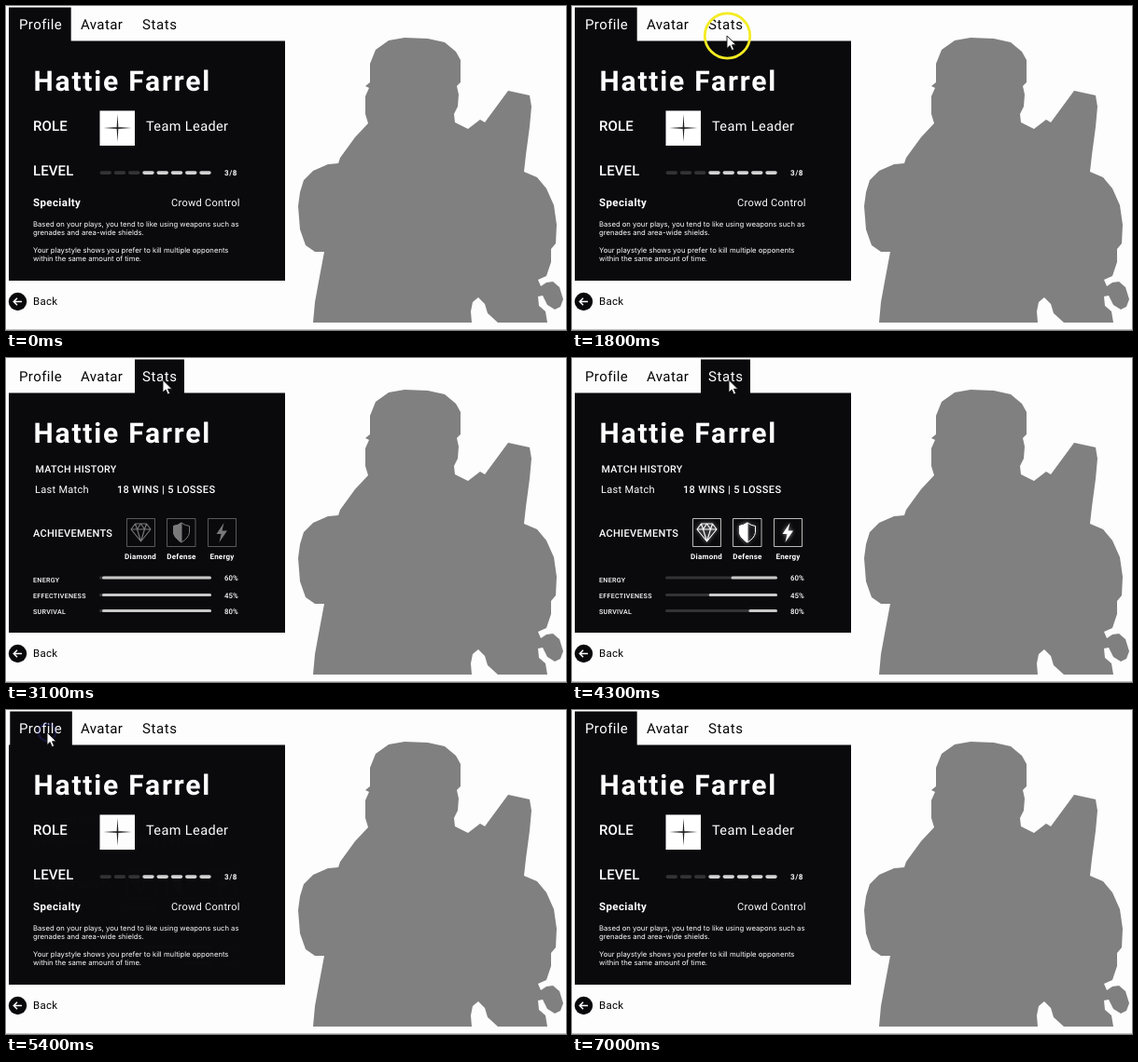
An HTML page that plays this animation: 600x348 px, repeating every 8 s.

```html
<!DOCTYPE html>
<html lang="en">
<head>
<meta charset="utf-8">
<title>Player profile</title>
<style>
  html, body { margin: 0; width: 100%; height: 100%; overflow: hidden; background: #fdfdfe; }
  svg { display: block; width: 600px; height: 348px; font-family: Roboto, Inter, sans-serif; text-rendering: geometricPrecision; }
  .body { font-family: Inter, sans-serif; }
  .icons { fill: none; stroke: #fff; stroke-linejoin: round; }
</style>
</head>
<body>
<svg viewBox="0 0 600 348">
  <path fill="#808080" d="M427 34L452 35 470 39 482 49 487 58V82L483 86 485 95 484 108 480 116 481 125 495 132 508 122 513 125 538 91 561 96 563 108 561 130 557 160 555 178 569 184 579 196 587 214 590 235 589 255 584 261 584 275 579 290 570 294 573 301 579 297 586 296 593 302 597 315 594 323 588 326 580 321 575 311 570 312 571 322 578 328 580 340H527L516 330 513 320 506 313 500 318 498 328 499 340H329L331 318 335 296 338 280 341 264 331 264 321 257 315 240 313 215 315 200 319 187 329 177 345 170 356 169 358 163 374 141 388 126 385 116V97L389 88 385 86 390 82V62L396 47 410 37Z"/>
  <path d="M0 347.5H600" stroke="#c4c4c8"/>
  <rect x="3" y="37.5" width="296" height="257.500" fill="#0a0a0d"/>
  <rect id="tab" y="1.5" height="37" fill="#0a0a0d"/>
  <g id="tabs"></g>
  <g id="head" fill="#fff"></g>
  <g id="profile" fill="#fff">
    <rect x="100.500" y="112.500" width="37.500" height="37.500"/>
    <path fill="#222" d="M119.500 116l.9 15-.9 15-.9-15zM104.500 131l15-.9 15 .9-15 .9z"/>
  </g>
  <g id="stats" fill="#fff">
    <g id="icons" class="icons">
      <path d="M129.500 172.500h30v30h-30zM172.500 172.500h30.500v30h-30.500zM216.500 172.500h30v30h-30z" stroke-width=".9" stroke-opacity=".8"/>
      <g id="art">
        <path d="M138.500 178h12l4.500 6-10.500 13-10.500-13zM134 184h21M138.500 178l2 6 4 13 4-13 2-6M140.500 184l4-6 4 6" stroke-width="1.100"/>
        <path d="M188 177q4 3 8.500 3.500v7q-1 6-8.500 10.500-7.500-4.500-8.500-10.500v-7q4.500-.5 8.500-3.500z"/>
        <path d="M188 177q-4 3-8.500 3.500v7q1 6 8.500 10.500z" fill="#fff"/>
        <path d="M233.500 177l-8 12h5l-2 9 8.500-12.500h-5.500z" fill="#fff" stroke="none"/>
      </g>
    </g>
  </g>
  <circle cx="12.500" cy="317.500" r="9.700" fill="#08080a"/>
  <path d="M17 317.500H8.500M12 313.800l-3.700 3.700 3.700 3.700" fill="none" stroke="#fff" stroke-width="1.500"/>
  <g id="foot"></g>
  <g id="pointer">
    <circle id="halo" cx=".5" r="24.200" fill="none" stroke="#f4ec22" stroke-width="2.800"/>
    <circle id="click" fill="none" stroke="#3d3fd0" stroke-width="2.400"/>
    <path d="M0 0V13.500L3.200 10.600 5.300 15.600 7.600 14.600 5.500 9.800H9.800Z" fill="#fff" stroke="#111" stroke-width=".9"/>
  </g>
</svg>
<script>
const $ = id => document.getElementById(id);

function add(parent, tag, attrs, text) {
  const el = document.createElementNS('http://www.w3.org/2000/svg', tag);
  for (const k in attrs) el.setAttribute(k, attrs[k]);
  if (text) el.textContent = text;
  return $(parent).appendChild(el);
}
const label = (parent, x, y, size, text, weight = 400, gap = .3, more = {}) =>
  add(parent, 'text', { x, y, 'font-size': size, 'font-weight': weight, 'letter-spacing': gap, ...more }, text);
const bar = (parent, x, y, width, height, fill) =>
  add(parent, 'rect', { x, y, width, height, rx: height / 2, fill });

const profileTab = label('tabs', 14, 25, 15, 'Profile', 400, .4);
label('tabs', 80, 25, 15, 'Avatar', 400, .4);
const statsTab = label('tabs', 146, 25, 15, 'Stats', 400, .6);
label('head', 29.500, 91, 30, 'Hattie Farrel', 700, 1.8);
label('foot', 29, 321, 11.400, 'Back', 400, .3);

label('profile', 29, 134, 15, 'ROLE', 500, .1);
label('profile', 150, 134, 14.500, 'Team Leader', 400, .4);
label('profile', 29, 182, 15, 'LEVEL', 500, .1);
label('profile', 234, 182.200, 8, '3/8', 700, .6);
label('profile', 29, 214.500, 11.500, 'Specialty', 700, .4);
label('profile', 177, 214.500, 11, 'Crowd Control');
[
  [236.500, 'Based on your plays, you tend to like using weapons such as'],
  [246, 'grenades and area-wide shields.'],
  [264.700, 'Your playstyle shows you prefer to kill multiple opponents'],
  [274.200, 'within the same amount of time.']
].forEach(([y, text]) => label('profile', 29, y, 7.7, text, 400, 0, { class: 'body' }));
for (let i = 0; i < 8; i++) bar('profile', 100.500 + i * 15.250, 177.300, 12.500, 3.600, i < 3 ? '#333336' : '#d2d2d2');

label('stats', 31.500, 123, 10.700, 'MATCH HISTORY', 500);
label('stats', 31, 144.500, 11, 'Last Match');
label('stats', 119, 144.500, 11, '18 WINS | 5 LOSSES', 500, .35);
label('stats', 29, 191.500, 11, 'ACHIEVEMENTS', 500);
[[144, 'Diamond'], [188, 'Defense'], [231.500, 'Energy']].forEach(([x, text]) =>
  label('stats', x, 216, 8, text, 700, .25, { 'text-anchor': 'middle' }));
const meters = [
  [236, 'ENERGY', '60%', 71, 241],
  [254.500, 'EFFECTIVENESS', '45%', 47, 257.500],
  [271.500, 'SURVIVAL', '80%', 90, 274.500]
].map(([y, name, value, full, base]) => {
  label('stats', 29, base, 7.1, name, 500);
  label('stats', 234, y + 3, 7.8, value, 500, .1);
  bar('stats', 100, y - 1.500, 120, 3, '#333336');
  return { full, el: bar('stats', 100, y - 1.500, 120, 3, '#c8c8c8') };
});

const clamp = v => Math.max(0, Math.min(1, v));
const mix = (a, b, p) => a + (b - a) * p;
const part = (t, start, length) => clamp((t - start) / length);

// cubic-bezier(0, 0, .58, 1)
function easeOut(x) {
  let lo = 0, hi = 1, s = .5;
  for (let i = 0; i < 20; i++) {
    s = (lo + hi) / 2;
    if (1.74 * s * s * (1 - s) + s ** 3 < x) lo = s; else hi = s;
  }
  return s * s * (3 - 2 * s);
}

const path = [
  [1000, 365, 330], [1200, 290, 215], [1400, 175, 110], [1600, 133, 58],
  [1800, 166, 32], [2000, 168, 23.500], [4500, 168, 23.500], [4750, 104, 27], [5000, 44, 24], [8000, 44, 24]
];
function pointerAt(t) {
  const i = Math.max(1, path.findIndex(k => k[0] > t));
  const [a, b] = [path[i - 1], path[i]], p = part(t, a[0], b[0] - a[0]);
  return [mix(a[1], b[1], p), mix(a[2], b[2], p)];
}

const within = (t, a, b) => t >= a && t < b;
const show = (id, on) => $(id).setAttribute('visibility', on ? 'visible' : 'hidden');
const grey = v => `rgb(${v},${v},${v})`;

function draw(t) {
  const p = easeOut(part(t, 2307, 300)) - easeOut(part(t, 5122, 300));
  $('tab').setAttribute('x', mix(3, 138, p));
  $('tab').setAttribute('width', mix(66.700, 53, p));
  profileTab.setAttribute('fill', grey(mix(255, 8, p)));
  statsTab.setAttribute('fill', grey(mix(8, 255, p)));
  $('profile').setAttribute('opacity', 1 - p);
  $('stats').setAttribute('opacity', p);

  const fill = easeOut(part(t, 3550, 800));
  meters.forEach(({ el, full }) => {
    const done = mix(3, full, fill);
    el.setAttribute('x', 100 + done);
    el.setAttribute('width', 120 - done);
  });
  $('icons').setAttribute('opacity', mix(.45, 1, fill));
  $('art').style.filter = `drop-shadow(0 0 2px rgba(255,255,255,${.6 * fill}))`;

  const on = within(t, 1000, 7000);
  show('pointer', on);
  $('pointer').setAttribute('transform', `translate(${pointerAt(t)})`);
  show('halo', on && (t < 2300 || within(t, 4600, 5100) || t >= 6900));
  const since = t - (t < 4000 ? 2290 : 5090), fade = part(since, 140, 220);
  show('click', on && since >= 0 && fade < 1);
  $('click').setAttribute('r', mix(6.300, 10, fade));
  $('click').setAttribute('opacity', 1 - fade);
}

function tick() {
  draw(Math.floor(performance.now() % 8000 / 100) * 100);
  requestAnimationFrame(tick);
}
tick();
</script>
</body>
</html>
```
